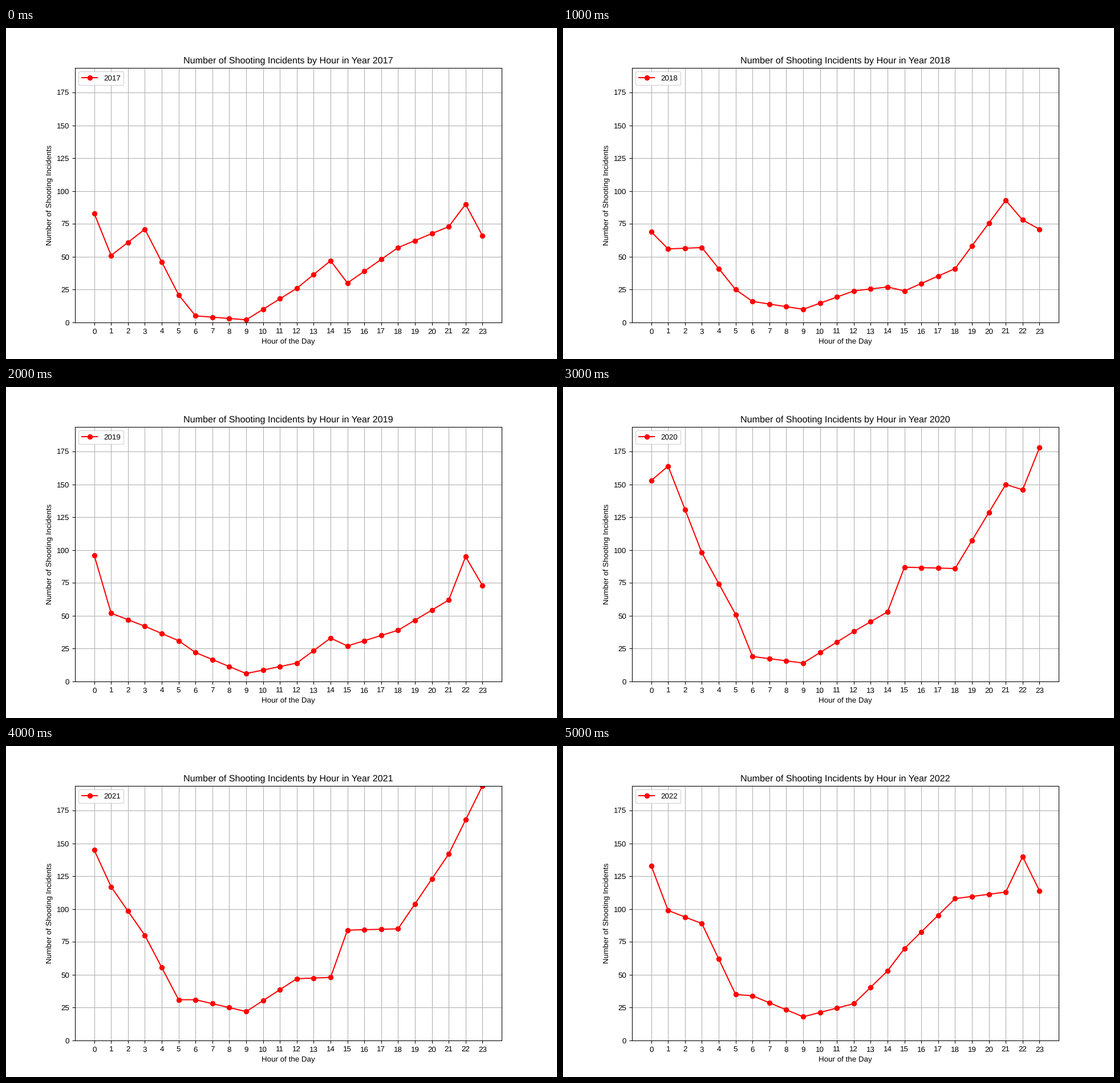
Recreate the animation shown at these times as a matplotlib script. Size 966x580 px, loop 6000 ms.

```python
import matplotlib.pyplot as plt
import numpy as np
from matplotlib.animation import FuncAnimation

plt.rcParams.update({
    "font.family": "Liberation Sans",
    "text.hinting": "none",
    "xtick.major.pad": 4,
    "axes.labelpad": 4.6,
    "legend.borderpad": 0.44,
})

DPI = 96.6
FIRST_YEAR = 2017
HOURS = np.arange(24)
TOP = 194

# Turning points of the day; the hours between lie on straight lines
KEY_HOURS = [0, 1, 3, 5, 6, 9, 12, 14, 15, 18, 21, 22, 23]
KEY_COUNTS = [
    [83, 51, 71, 21, 5, 2, 26, 47, 30, 57, 73, 90, 66],
    [69, 56, 57, 25, 16, 10, 24, 27, 24, 41, 93, 78, 71],
    [96, 52, 42, 31, 22, 6, 14, 33, 27, 39, 62, 95, 73],
    [153, 164, 98, 51, 19, 14, 38, 53, 87, 86, 150, 146, 178],
    [145, 117, 80, 31, 31, 22, 47, 48, 84, 85, 142, 168, TOP],
    [133, 99, 89, 35, 34, 18, 28, 53, 70, 108, 113, 140, 114],
]


def counts(i):
    return np.interp(HOURS, KEY_HOURS, KEY_COUNTS[i])


# The small surplus keeps the pixel size from rounding down
fig, ax = plt.subplots(figsize=(966.005 / DPI, 580.005 / DPI), dpi=DPI)
fig.subplots_adjust(left=0.1249, right=0.9, bottom=0.1105, top=0.88)
line, = ax.plot(HOURS, counts(0), "o-", color="red", label=str(FIRST_YEAR))
ax.set_xlim(-1.15, 24.15)
ax.set_ylim(0, TOP)
ax.set_xticks(HOURS)
ax.set_xlabel("Hour of the Day")
ax.set_ylabel("Number of Shooting Incidents")
ax.grid(True)
legend_text = ax.legend(loc="upper left").get_texts()[0]


def draw(i):
    year = FIRST_YEAR + i
    line.set_ydata(counts(i))
    legend_text.set_text(str(year))
    ax.set_title(f"Number of Shooting Incidents by Hour in Year {year}")
    return line, legend_text, ax.title


anim = FuncAnimation(fig, draw, frames=len(KEY_COUNTS),
                     init_func=lambda: draw(0), interval=1000,
                     repeat=True, repeat_delay=0, blit=False)
plt.show()
```
